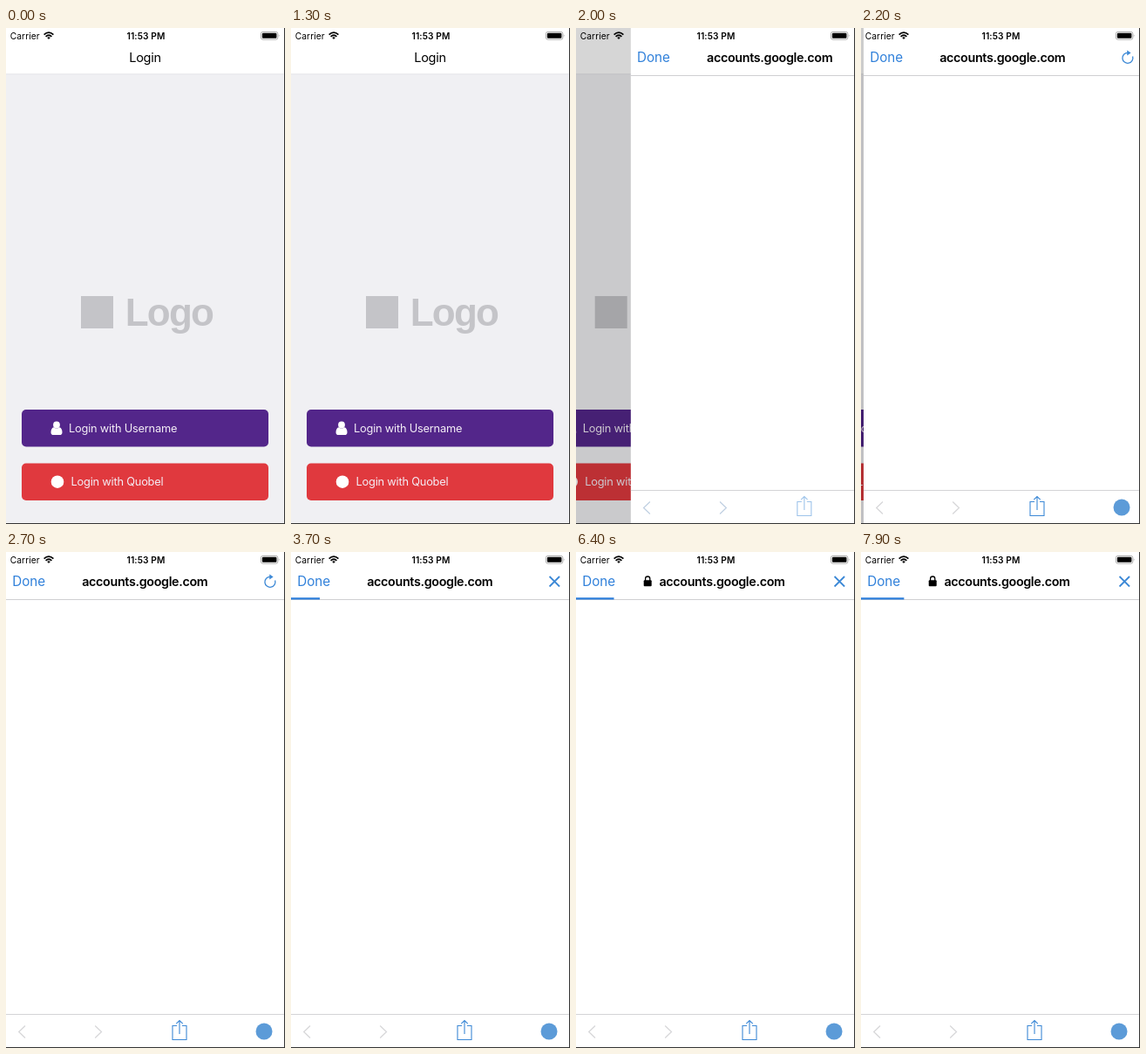
Recreate the animation shown at these times as an HTML page. Size 320x568 px, loop 8 s.

```html
<!DOCTYPE html>
<html lang="en">
<head>
<meta charset="utf-8">
<title>Login</title>
<style>
  html, body { margin: 0; width: 100%; height: 100%; overflow: hidden; background: #fff; }
  svg { display: block; width: 100vw; height: 100vh; }
  text { font-family: Inter, Roboto, sans-serif; }
  .middle { text-anchor: middle; }
  .title { font-size: 14.5px; letter-spacing: -.02em; }
  .address { font-size: 14.3px; font-weight: 600; letter-spacing: -.023em; }
  .label { font-size: 12.8px; letter-spacing: -.016em; fill: #f4eef6; }
  .status { font-size: 10.2px; letter-spacing: .01em; }
  .logo { font: bold 44px "Liberation Sans", Arial, sans-serif; letter-spacing: -1.8px; }
  .line { fill: none; stroke: #3d89d6; }
</style>
</head>
<body>
<svg viewBox="0 0 320 568" preserveAspectRatio="none">
  <rect width="320" height="568" fill="#f0f0f3"/>

  <g id="login">
    <rect width="340" height="568" fill="#f0f0f3"/>
    <rect width="340" height="53" fill="#fff"/>
    <rect y="52.5" width="340" height=".7" fill="#dcdce0"/>
    <text class="title middle" x="159.5" y="38.5">Login</text>

    <g fill="#c4c4c8">
      <rect x="86" y="307" width="37" height="37"/>
      <text class="logo" x="136.8" y="341">Logo</text>
    </g>

    <rect x="18" y="437" width="283" height="42.5" rx="5" fill="#53268a"/>
    <g fill="#fff">
      <circle cx="58" cy="454.5" r="3.9"/>
      <path d="M54.5 457.2Q58 460 61.5 457.2Q64.5 458.5 64.5 463.2Q64.3 466 61.8 466H54.2Q51.7 466 51.5 463.2Q51.5 458.5 54.5 457.2Z"/>
    </g>
    <text class="label" x="72" y="462.7">Login with Username</text>

    <rect x="18" y="498.5" width="283" height="42.5" rx="5" fill="#e0393e"/>
    <circle cx="59" cy="519.7" r="7.3" fill="#fff"/>
    <text class="label" x="74.5" y="524">Login with Quobel</text>
    <rect id="press" x="18" y="498.5" width="283" height="42.5" rx="5"/>
  </g>
  <rect id="dim" width="320" height="568"/>

  <g id="browser">
    <rect width="320" height="568" fill="#fff"/>
    <rect y="54" width="320" height="1" fill="#d0d0d2"/>
    <rect y="529" width="320" height="1" fill="#d4d4d6"/>

    <g id="header">
      <text x="7.2" y="39" font-size="15.2" fill="#3080da">Done</text>
      <g id="lock">
        <rect x="77.7" y="32.3" width="9" height="7" rx="1"/>
        <path d="M79.6 33V30.6a2.6 2.6 0 0 1 5.2 0V33" fill="none" stroke="#000" stroke-width="1.3"/>
      </g>
      <text id="address" class="address middle" y="38.5">accounts.google.com</text>
      <g id="reload">
        <path class="line" d="M308.6 32.5A6 6 0 1 1 303 28.3" stroke-width="1.3"/>
        <path d="M302.2 25.6L306.6 28.5L302.2 31.4Z" fill="#3d89d6"/>
      </g>
      <path id="stop" class="line" d="M296.5 28L308 39.5M308 28L296.5 39.5" stroke-width="1.8"/>
    </g>

    <g id="toolbar">
      <path id="arrows" d="M22 542.5L14.7 549.5L22 556.5M102.2 542.5L109.5 549.5L102.2 556.5" fill="none" stroke-width="1.2"/>
      <path class="line" d="M196 542.5H191V558.5H207V542.5H202M199 552V536.5M195.3 540.2L199 536.5L202.7 540.2" stroke-width="1.1"/>
      <circle cx="296" cy="549" r="9.5" fill="#5c9bd8"/>
    </g>
    <rect id="progress" y="52.2" height="2.3" fill="#2f7fdb"/>
  </g>

  <g>
    <text class="status" x="4.7" y="12.5">Carrier</text>
    <g fill="none" stroke="#000" stroke-width="1.7">
      <path d="M43.6 7.6Q49 2.6 54.4 7.6M45.6 9.8Q49 6.7 52.4 9.8"/>
      <path d="M47.2 10.9L49 13L50.8 10.9Q49 9.6 47.2 10.9Z" fill="#000" stroke="none"/>
    </g>
    <text class="status middle" x="160.5" y="12.5" font-weight="600">11:53 PM</text>
    <rect x="292.4" y="4.4" width="19.4" height="8.8" rx="2.2" fill="none" stroke="#999" stroke-width=".8"/>
    <rect x="293.8" y="5.8" width="16.6" height="6" rx="1.1"/>
    <path d="M312.8 7.3Q314.4 8.8 312.8 10.3Z" fill="#999"/>
  </g>
  <path d="M319.5 0V568M0 567.5H320" stroke="#333" stroke-width="1"/>
</svg>

<script>
const LOOP = 8000, WIDTH = 320;
const el = Object.fromEntries([...document.querySelectorAll("[id]")].map(e => [e.id, e]));
const ramp = (t, from, to) => Math.min(1, Math.max(0, (t - from) / (to - from)));
const show = (node, opacity) => node.setAttribute("opacity", opacity);
const slide = (node, x) => node.setAttribute("transform", `translate(${x} 0)`);

// Critically damped slide: 0 is off to the right, 1 is in place.
function pushProgress(t) {
  if (t < 1875) return 0;
  const u = t < 2000 ? (t - 1875) * .024 : 3 + (t - 2000) * .0185;
  return 1 - (1 + u) * Math.exp(-u);
}

function progressWidth(t) {
  if (t < 3400) return 0;
  if (t < 3700) return 33 * (1 - (1 - ramp(t, 3400, 3700)) ** 3);
  return 33 + (t - 3700) * .0039;
}

function draw(t) {
  const push = pushProgress(t);
  const loading = t >= 3400, secure = t >= 4300;

  slide(el.login, -80 * push);
  slide(el.browser, WIDTH * (1 - push));
  show(el.dim, .2 * push);
  show(el.press, .16 * ramp(t, 1500, 1650) * (1 - ramp(t, 1900, 2000)));

  show(el.header, ramp(t, 1900, 1990));
  show(el.toolbar, t < 2000 ? .5 * ramp(t, 1900, 2000) : .5 + .5 * ramp(t, 2000, 2200));
  el.arrows.setAttribute("stroke", t < 2100 ? "#7f9fc4" : "#d6d6d8");

  show(el.reload, loading ? 0 : 1);
  show(el.stop, loading ? 1 : 0);
  show(el.lock, secure ? 1 : 0);
  el.address.setAttribute("x", secure ? 167.5 : 159.3);
  el.progress.setAttribute("width", progressWidth(t));
}

function tick() {
  draw(performance.now() % LOOP);
  requestAnimationFrame(tick);
}
tick();
</script>
</body>
</html>
```
